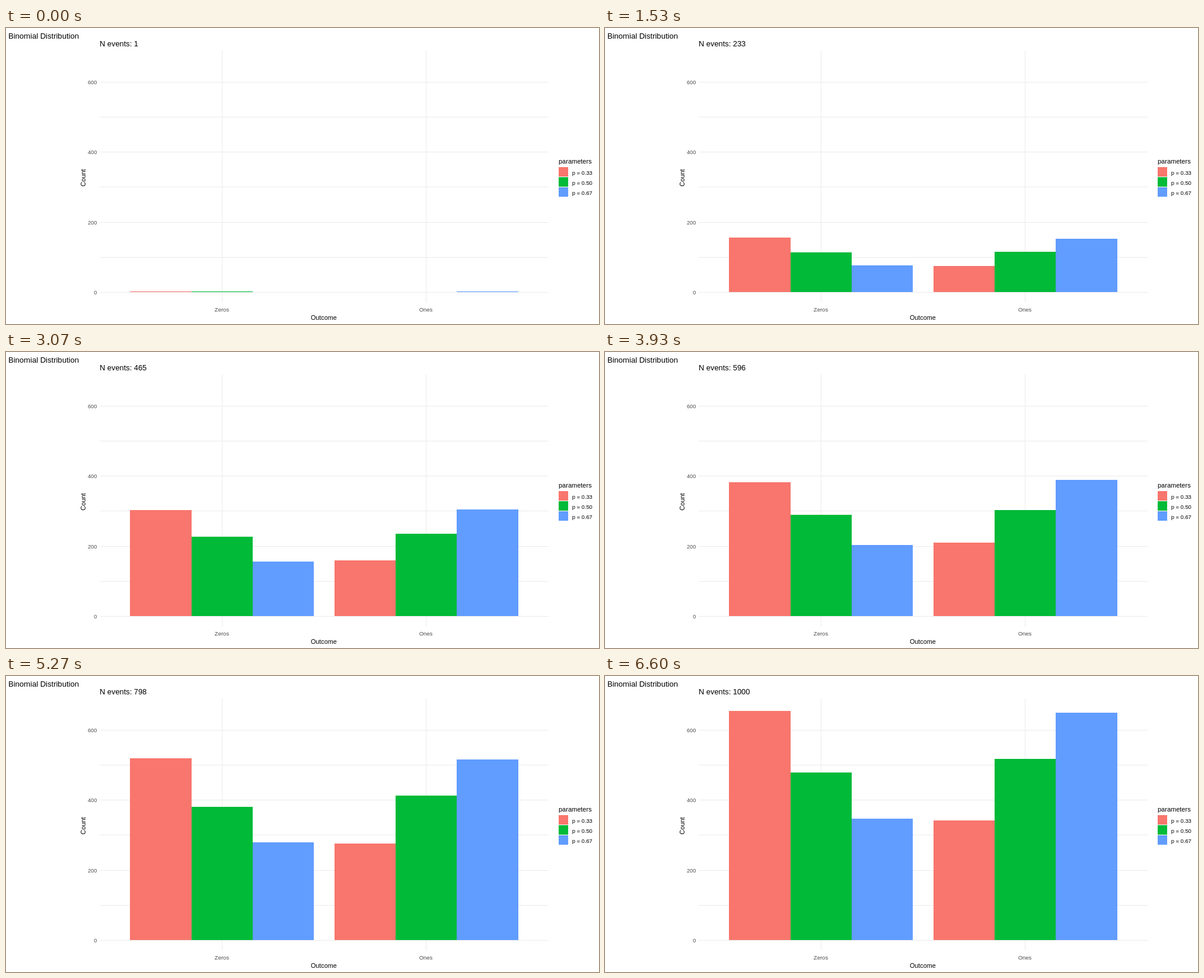
Recreate the animation shown at these times as an HTML page. Size 1000 by 500 pixels, loop 6.67 s.

```html
<!DOCTYPE html>
<html lang="en">
<head>
<meta charset="utf-8">
<title>Binomial Distribution</title>
<style>
  html, body { margin: 0; width: 100%; height: 100%; overflow: hidden; background: #fff; }
  svg { display: block; width: 1000px; height: 500px; font-family: "Liberation Sans", Arial, sans-serif; }
</style>
</head>
<body>
<svg id="chart" viewBox="0 0 1000 500"></svg>
<script>
const LOOP = 6670, LAST_STEP = 99, EVENTS = 1000;
const BASE = 446, PIXELS_PER_EVENT = 0.5918;
const LEFT = 209.4, BAR_WIDTH = 103.3, GROUP_WIDTH = 344.4;

// Running number of ones after each of these event counts
const milestones = [1, 334, 596, 879, EVENTS];
const trials = [
  { p: '0.33', color: '#f8766d', ones: [0, 109, 212, 303, 343] },
  { p: '0.50', color: '#00ba38', ones: [0, 169, 305, 459, 519] },
  { p: '0.67', color: '#619cff', ones: [1, 222, 391, 567, 651] },
];

const chart = document.getElementById('chart');

function add(tag, attrs, content = '') {
  const node = document.createElementNS('http://www.w3.org/2000/svg', tag);
  for (const name in attrs) node.setAttribute(name, attrs[name]);
  node.textContent = content;
  return chart.appendChild(node);
}
const rect = (x, y, width, height, fill) => add('rect', { x, y, width, height, fill });
const text = (content, x, y, size, extra = {}) =>
  add('text', { x, y, 'font-size': size, ...extra }, content);

const centered = { 'text-anchor': 'middle' };
const tickColor = { fill: '#4d4d4d' };

// Grid and tick labels
for (let value = 0; value <= 600; value += 100) {
  const y = Math.round(BASE - value * PIXELS_PER_EVENT);
  rect(158, y, 757, 1, '#ebebeb');
  if (value % 200 === 0) text(value, 153.3, y + 4, 9.2, { ...tickColor, 'text-anchor': 'end' });
}
['Zeros', 'Ones'].forEach((label, group) => {
  const x = Math.floor(LEFT + BAR_WIDTH * 1.5 + group * GROUP_WIDTH);
  rect(x, 38, 1, 426, '#ebebeb');
  text(label, x, 479, 9.5, { ...tickColor, ...centered });
});

// Titles and counter
text('Outcome', 535.8, 493, 10.8, centered);
text('Count', 0, 0, 11, { ...centered, transform: 'translate(134 253) rotate(-90)' });
text('Binomial Distribution', 4, 18, 13.05);
const counter = text('', 158, 31, 12.85);

// Legend and bars
text('parameters', 932, 229, 11);
trials.forEach((trial, i) => {
  rect(932, 235 + 17 * i, 16, 16, trial.color);
  text('p = ' + trial.p, 954.7, 248 + 17 * i, 9.4);
  trial.bars = [0, 1].map(group => {
    const left = LEFT + group * GROUP_WIDTH + i * BAR_WIDTH;
    const x = Math.round(left);
    return rect(x, BASE, Math.round(left + BAR_WIDTH) - x, 0, trial.color);
  });
});

function onesAfter(events, ones) {
  const i = Math.max(1, milestones.findIndex(mark => mark >= events));
  const part = (events - milestones[i - 1]) / (milestones[i] - milestones[i - 1]);
  return Math.round(ones[i - 1] + part * (ones[i] - ones[i - 1]));
}

// A bar that holds any event is at least one pixel high
function setCount(bar, count) {
  const height = Math.max(Math.min(count, 1), Math.round(count * PIXELS_PER_EVENT - 1.35));
  bar.setAttribute('y', BASE - height);
  bar.setAttribute('height', height);
}

// Steps are 66.7 ms apart, snapped to hundredths of a second
const stepStart = step => Math.round(step * 20 / 3) * 10;

function draw(time) {
  const t = time % LOOP;
  let step = Math.min(LAST_STEP, Math.floor(t * 3 / 200) + 1);
  while (stepStart(step) > t) step--;
  const events = Math.round(1 + (EVENTS - 1) * step / LAST_STEP);
  counter.textContent = 'N events: ' + events;
  for (const { bars: [zerosBar, onesBar], ones } of trials) {
    const count = onesAfter(events, ones);
    setCount(zerosBar, events - count);
    setCount(onesBar, count);
  }
}

let start;
function animate(now) {
  start ??= now;
  draw(now - start);
  requestAnimationFrame(animate);
}
draw(0);
requestAnimationFrame(animate);
</script>
</body>
</html>
```
